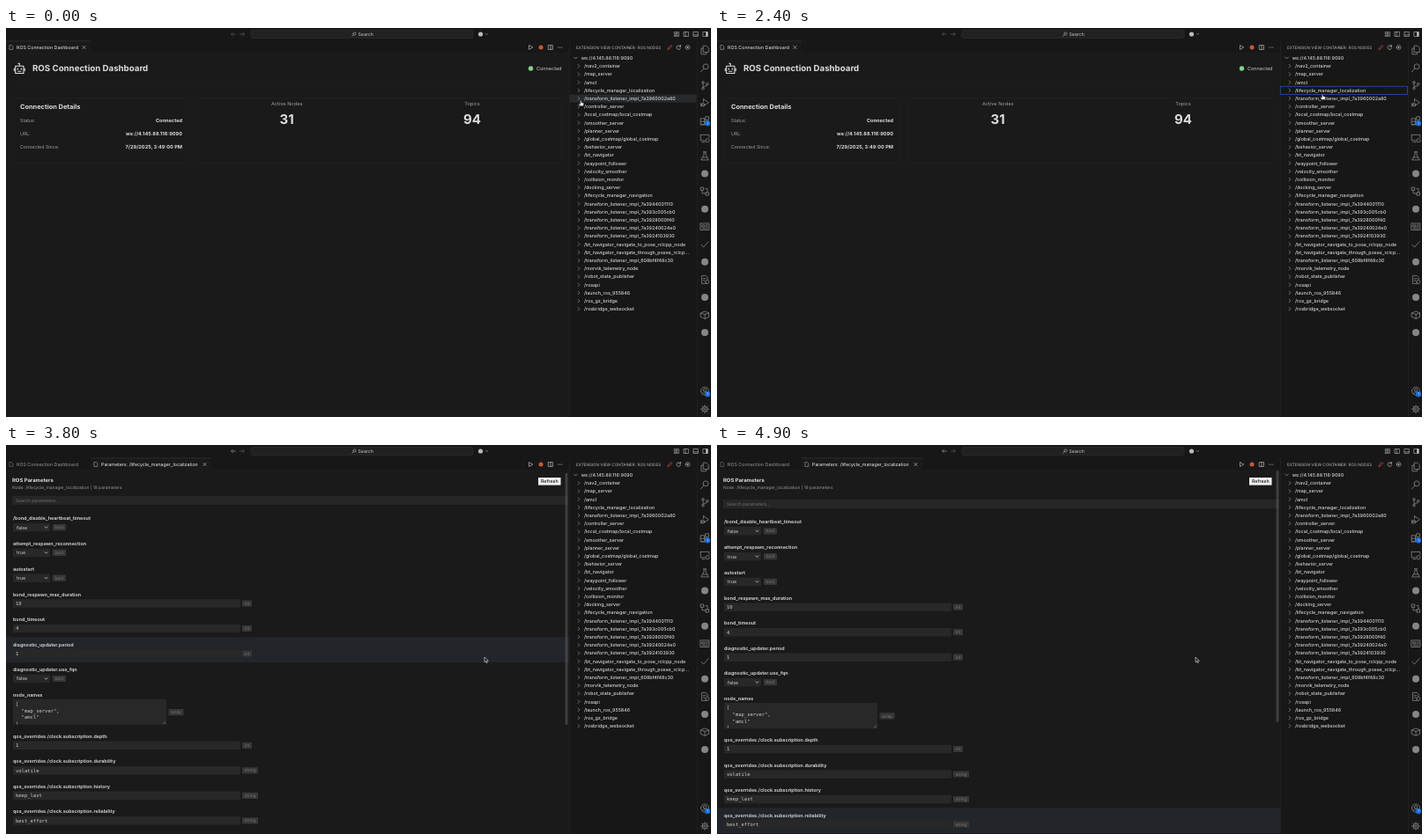
Recreate the animation shown at these times as an HTML page. Size 800x442 px, loop 5000 ms.

```html
<!DOCTYPE html>
<html lang="en">
<head>
<meta charset="utf-8">
<title>ROS node parameters</title>
<style>
html, body { margin: 0; width: 100%; height: 100%; overflow: hidden; background: #181818; }
svg { display: block; width: 100%; height: 100%; }
text { font-family: Inter, "Open Sans", sans-serif; fill: #ccc; text-rendering: geometricPrecision; }
.mono { font-family: "DejaVu Sans Mono", monospace; }
.medium { font-weight: 500; }
.bold { font-weight: 700; }
.line { fill: none; stroke: #868686; stroke-width: .8; stroke-linejoin: round; stroke-linecap: round; }
</style>
</head>
<body>
<svg id="stage" viewBox="0 0 800 442" preserveAspectRatio="none"></svg>
<script>
const LOOP = 5000, STEP = 100, OPEN_AT = 2700, CLICK_AT = 1700, SCROLL_AT = 3700;
const ROW = 9.2, FIRST_ROW = 43.3, TOP = 29, MAX_SCROLL = 183.5;

// y is the middle of the capitals
const text = (x, y, str, size = 5.4, { fill = '#ccc', cls = '', anchor = 'start' } = {}) =>
  `<text x="${x}" y="${y + size * .36}" font-size="${size}" class="${cls}" text-anchor="${anchor}" style="fill:${fill}">${str}</text>`;
const box = (x, y, w, h, fill, extra = '') =>
  `<rect x="${x}" y="${y}" width="${w}" height="${h}" fill="${fill}" ${extra}/>`;
const dot = (x, y, r, fill) => `<circle cx="${x}" cy="${y}" r="${r}" fill="${fill}"/>`;
const line = (x, y, d, stroke = '#868686', width = .8) =>
  `<path class="line" transform="translate(${x} ${y})" d="${d}" style="stroke:${stroke};stroke-width:${width}"/>`;
const ring = (x, y, r) => `M${x - r} ${y}a${r} ${r} 0 1 0 ${2 * r} 0a${r} ${r} 0 1 0 ${-2 * r} 0`;

const CROSS = 'M-1.6-1.6l3.2 3.2M1.6-1.6l-3.2 3.2';
const RIGHT = 'M-.9-1.8l1.8 1.8-1.8 1.8';
const DOWN = 'M-1.8-.9l1.8 1.8 1.8-1.8';
const PAGE = 'M-1.7-2.4h2.2l1.3 1.3v3.5h-3.5z';

const nodes = `nav2_container map_server amcl lifecycle_manager_localization
  transform_listener_impl_7a3960002a80 controller_server local_costmap/local_costmap smoother_server
  planner_server global_costmap/global_costmap behavior_server bt_navigator waypoint_follower
  velocity_smoother collision_monitor docking_server lifecycle_manager_navigation
  transform_listener_impl_7a3944001110 transform_listener_impl_7a393c005cb0
  transform_listener_impl_7a3928000f40 transform_listener_impl_7a39240024e0
  transform_listener_impl_7a3924103930 bt_navigator_navigate_to_pose_rclcpp_node
  bt_navigator_navigate_through_poses_rclcp... transform_listener_impl_608bf4f48c30
  morvik_telemetry_node robot_state_publisher rosapi launch_ros_955846 ros_gz_bridge
  rosbridge_websocket`.split(/\s+/);

const qos = (topic, depth, reliability) => [
  ['depth', depth, 'int'], ['durability', 'volatile', 'string'],
  ['history', 'keep_last', 'string'], ['reliability', reliability, 'string'],
].map(([key, value, type]) => [`qos_overrides./${topic}.${key}`, value, type]);

const params = [
  ['/bond_disable_heartbeat_timeout', 'false', 'bool'],
  ['attempt_respawn_reconnection', 'true', 'bool'],
  ['autostart', 'true', 'bool'],
  ['bond_respawn_max_duration', '10', 'int'],
  ['bond_timeout', '4', 'int'],
  ['diagnostic_updater.period', '1', 'int'],
  ['diagnostic_updater.use_fqn', 'false', 'bool'],
  ['node_names', '', 'array'],
  ...qos('clock.subscription', '1', 'best_effort'),
  ...qos('parameter_events.publisher', '1000', 'reliable'),
  ['start_type_description_service', 'true', 'bool'],
  ['use_sim_time', 'true', 'bool', 'Use simulation time instead of wall-clock time'],
];
const PITCH = { bool: 28.8, int: 28.5, string: 28.5, array: 47 };
let nextY = 87.5;
const tops = params.map(([, , type, note]) => {
  const y = nextY;
  nextY += PITCH[type] + (note ? 10 : 0);
  return y;
});

function badge(x, y, type) {
  const w = { bool: 15, int: 11, string: 18, array: 17 }[type];
  return box(x, y - 3.6, w, 7.2, '#373737', 'rx=".8"') +
    text(x + w / 2, y, type, 4.7, { fill: '#777', anchor: 'middle' });
}

function param([name, value, type, note], i) {
  const y = tops[i], mid = y + (note ? 20.5 : 10.3);
  let out = text(8, y, name, 5.35, { cls: 'bold' });
  if (note) out += text(8, y + 8.5, note, 4.9, { fill: '#999' });
  if (type === 'bool') {
    out += box(8, mid - 4.7, 42, 9.4, '#282828') + text(12, mid, value) +
      line(45.5, mid, 'M-1.5-.8l1.5 1.6 1.5-1.6', '#ccc') + badge(53, mid, type);
  } else if (type === 'array') {
    out += box(8, y + 4.8, 174, 29, '#282828') + badge(184.5, y + 19.7, type) +
      line(180, y + 32, 'M-2 1l3-3M0 1l1-1', '#888', .5);
    ['[', '"map_server",', '"amcl"', ']'].forEach((s, k) => {
      out += text(k % 3 ? 17.6 : 11, y + 9.8 + k * 7.8, s, 5.5, { cls: 'mono' });
    });
    out = `<g clip-path="url(#area)">${out}</g>`;
  } else {
    out += box(8, mid - 4.7, 258, 9.4, '#282828') +
      text(11, mid, value, 5.5, { cls: 'mono' }) + badge(268, mid, type);
  }
  return out;
}

function titleBar() {
  return box(0, 0, 800, 14.6, '#171717') +
    `<g id="back">${line(258, 7, 'M2.4 0h-4.8m1.8-1.8l-1.8 1.8 1.8 1.8')}</g>` +
    line(268, 7, 'M-2.4 0h4.8m-1.8-1.8l1.8 1.8-1.8 1.8', '#555') +
    box(278, 2.5, 252, 9, '#212121', 'rx="2" stroke="#343434" stroke-width=".5"') +
    line(395, 7, ring(.5, -.5, 1.6) + 'M-.7.7l-1.6 1.7', '#bbb', .6) + text(399.5, 7, 'Search', 5.2) +
    dot(538.5, 7, 2.6, '#bbb') + line(545.5, 7, 'M-1.2-.6l1.2 1.2 1.2-1.2', '#aaa', .6) +
    ['M-2.4-2.4h2v2h-2zM-2.4 1h2v1.4h-2zM1-2.4h1.4v4.8H1z', 'M-2.5-2.5h5v5h-5zM-.8-2.5v5',
     'M-2.5-2.5h5v5h-5zM-2.5.8h5', 'M-2.5-2.5h5v5h-5zM.8-2.5v5']
      .map((d, i) => line(761 + i * 10.9, 7, d, '#bbb', .6)).join('') +
    box(794.5, 4.5, 1.8, 5, '#ccc');
}

function tabBar() {
  return box(0, 14.6, 639, 14.6, '#171717') + box(0, 28.8, 639, .4, '#292929') +
    line(595.5, 22, 'M-1.7-2.3l4 2.3-4 2.3z', '#bbb', .7) + dot(607, 22, 2.5, '#c45a38') +
    line(618, 22, 'M-2.4-2.4h4.8v4.8h-4.8zM0-2.4v4.8', '#bbb', .7) +
    [626.8, 628.8, 630.8].map(x => dot(x, 22, .55, '#bbb')).join('');
}

const tab = (x, w, label, active) =>
  (active ? box(x, 14.6, w, 14.7, '#1a1a1a') + box(x, 14.6, w, .6, '#2f3a44') : '') +
  line(x + 6, 22, PAGE, active ? '#aaa' : '#777', .6) +
  text(x + 12, 22, label, 5.3, { fill: active ? '#eee' : '#999' }) +
  (active ? line(x + w - 7.5, 22, CROSS, '#ccc', .6) : '');

function dashboard() {
  const rows = [['Status:', 'Connected', 105], ['URL:', 'ws://4.145.88.116:9090', 120.3],
                ['Connected Since:', '7/29/2025, 3:49:00 PM', 135.3]];
  const card = 'stroke="#242424" stroke-width=".6" rx="1.5"';
  const stat = (x, label, n) => text(x, 86.3, label, 5.6, { fill: '#a0a0a0', anchor: 'middle' }) +
    text(x, 103.2, n, 15, { fill: '#ddd', cls: 'bold', anchor: 'middle' });
  return tab(0, 96, 'ROS Connection Dashboard', true) +
    line(15.3, 46, 'M-4.6-2.8h9.2v8.3h-9.2zM0-2.8v-3M-1.5-5.8h1.5M-6 0v2.6M6 0v2.6M-2-.2v1.4M2-.2v1.4M-1.6 3.2h3.2', '#ddd', 1.1) +
    text(30, 46, 'ROS Connection Dashboard', 9.7, { fill: '#ddd', cls: 'bold' }) +
    dot(595.5, 46, 2.7, '#82d28b') + text(602, 46, 'Connected', 5.5) +
    box(8, 66.8, 622, .4, '#212121') +
    box(8.3, 79.6, 200.5, 74, '#1a1a1a', card) + box(217, 79.6, 413, 74, '#1a1a1a', card) +
    text(16, 89, 'Connection Details', 7.4, { fill: '#ddd', cls: 'bold' }) +
    rows.map(([k, v, y]) => text(16, y, k, 5.3, { fill: '#a0a0a0' }) +
      text(200, y, v, 5.6, { fill: '#ddd', cls: 'bold', anchor: 'end' })).join('') +
    stat(318.7, 'Active Nodes', 31) + stat(529, 'Topics', 94);
}

function parameters() {
  return tab(0, 96, 'ROS Connection Dashboard', false) +
    tab(96, 137, 'Parameters: /lifecycle_manager_localization', true) +
    text(7, 40, 'ROS Parameters', 5.9, { fill: '#ddd', cls: 'bold' }) +
    text(7, 48, 'Node: /lifecycle_manager_localization | 18 parameters', 4.9, { fill: '#999' }) +
    box(604, 37, 25.5, 8.6, '#f2f2f2') +
    text(616.8, 41.3, 'Refresh', 5.3, { fill: '#111', cls: 'medium', anchor: 'middle' }) +
    `<g clip-path="url(#body)"><g id="list">
      <rect id="hover" width="639" height="28.8" fill="#22252a"/>
      ${box(7, 62, 630.5, 10, '#262626')}
      ${text(11, 67, 'Search parameters...', 5.05, { fill: '#707070' })}
      ${params.map(param).join('')}
    </g></g>
    <rect id="thumb" x="634.6" width="2.8" height="286" rx="1.2" fill="#797979" opacity=".4"/>`;
}

function sideBar() {
  const label = (x, y, str) => text(x, y, str, 5.35, { fill: '#d6d6d6', cls: 'medium' });
  return box(639, 14.6, 145, 428, '#171717') + box(639, 14.6, .5, 428, '#292929') +
    text(647, 22, 'EXTENSION VIEW CONTAINER: ROS NODES', 4.6, { fill: '#bbb' }) +
    line(753.3, 22, 'M-2.2 2.2l.5-1.7 3-3 1.2 1.2-3 3z', '#c24a42', .8) +
    line(763.3, 22, 'M1.9-1.2a2.3 2.3 0 1 0 .3 2M2.2-2.6v1.7h-1.7', '#bbb', .7) +
    line(773.5, 22, ring(0, 0, 2.4), '#bbb', .6) + dot(773.5, 22, .9, '#bbb') +
    `<rect id="row" x="639.3" width="144.2" height="${ROW}" stroke-width=".8"/>` +
    line(646.5, 34, DOWN, '#bbb', .6) + label(652.7, 34, 'ws://4.145.88.116:9090') +
    nodes.map((n, i) => line(650, FIRST_ROW + i * ROW, RIGHT, '#aaa', .6) +
      label(656, FIRST_ROW + i * ROW, '/' + n)).join('');
}

function activityBar() {
  const icons = [
    'M-1.5-4.8h3.3l2.4 2.4v5h-5.7zM-1.5-2h-2.6v6.8h5.6v-2.2',
    ring(1, -1.2, 3) + 'M-1.2 1l-3.4 3.8',
    ring(-2, -3.3, 1.3) + ring(-2, 3.5, 1.3) + ring(2.8, -1.5, 1.3) + 'M-2-2v4.2M2.8-.2c0 2-4.8.5-4.8 2.4',
    'M-1.5-4.5l5.8 4-5 3.4M-1.5-4.5v3' + ring(-2.2, 2, 1.9) + 'M-5 .4l1.2.8M-5 4l1.2-.8M-4.8 2h5',
    'M-4.5-2.5h4v7h-4zM-4.5 1h7.5v3.5h-7.5M1-4.5h3.5V-1H1z',
    'M-4.8-4h9.6v3M-4.8-4v6.5h4.5M-3 4.3h3' + ring(3, 2.4, 2.1),
    'M-1.5-4.6h3M-1-4.6v3.2l-3.3 5.9h8.6l-3.3-5.9v-3.2M-2.5 1.5h5',
    '',
    'M-4.5-4.5h3.2v3.2h-3.2zM1.3 1.3h3.2v3.2h-3.2zM-3-1.3v3.6h4.3M1-3h2v4',
    '',
    'M-4.8-3.8h9.6v7.6h-9.6zM-3-1.8h2.8v2h-2.8zM1.2-1.8h2M1.2 0h2M-3 2h6',
    'M-4 .5l2.5 2.8 5.6-6.5',
    '',
    'M2 4.5h-5.6v-9h4.8l2 2v2.2M-2-1.2h3M-2 1h2' + ring(2.7, 2.5, 2),
    '',
    'M-4.5-2.2l4.6-2 4.4 2v4.5l-4.4 2-4.6-2zM-4.5-2.2l4.6 1.7 4.4-1.7M.1-.5v4.8',
    '',
  ];
  const gear = Array.from({ length: 8 }, (_, i) => {
    const a = i * Math.PI / 4, c = Math.cos(a), s = Math.sin(a);
    return `M${3 * c} ${3 * s}L${4.5 * c} ${4.5 * s}`;
  }).join('');
  const count = y => dot(796, y, 3.2, '#1e6ad6') + text(796, y, '1', 4, { fill: '#fff', anchor: 'middle' });
  return box(784, 14.6, 16, 428, '#171717') + box(784, 14.6, .5, 428, '#292929') +
    icons.map((d, i) => d ? line(793, 25 + i * 20.07, d) : dot(793, 25 + i * 20.07, 4, '#868686')).join('') +
    count(108.3) + line(793, 412.5, ring(0, 0, 4.5) + ring(0, -1, 1.7) + 'M-3 3.2c1-2.6 5-2.6 6 0') + count(416) +
    line(793, 433, ring(0, 0, 3) + ring(0, 0, 1.2) + gear);
}

const stage = document.getElementById('stage');
stage.innerHTML = `<defs>
    <clipPath id="body"><rect y="57.5" width="639" height="385"/></clipPath>
    <clipPath id="area"><rect y="${tops[7] - 6}" width="639" height="39.8"/></clipPath>
  </defs>
  ${box(0, 0, 800, 442, '#1a1a1a')}${titleBar()}${tabBar()}
  <g id="dash">${dashboard()}</g><g id="params">${parameters()}</g>
  ${sideBar()}${activityBar()}
  <g id="cursor" stroke-width=".6" stroke-linejoin="round">
    <path id="arrow" fill="#111" stroke="#eee" d="M0 0v5.8l1.4-1.2.9 2 1-.4-.9-2h1.9z"/>
    <path id="hand" fill="#fff" stroke="#111" d="M-.7.4q.7-.8 1.4 0v2.2l2.1.5q.8.3.6 1.2l-.5 2.4h-3.6l-1.8-2.4q.2-.9 1.2-.3l.6.5z"/>
  </g>`;
const part = Object.fromEntries(['back', 'dash', 'params', 'list', 'hover', 'thumb', 'row', 'cursor', 'arrow', 'hand']
  .map(id => [id, document.getElementById(id)]));
const show = (el, on) => { el.style.display = on ? '' : 'none'; };

const path = [[0, 652.3, 82], [600, 681.5, 70], [1300, 681.5, 70], [2000, 687, 74.8], [2600, 687, 74.8],
              [3000, 610, 91], [3200, 610, 91], [3700, 543, 241]];
const scrolls = [[3700, 0], [3800, 4.2], [4300, MAX_SCROLL], [4600, MAX_SCROLL], [4900, 0]];

// eased values between [time, ...values] keys
function at(keys, t) {
  const i = keys.findIndex(k => k[0] > t);
  if (i < 1) return (i ? keys[keys.length - 1] : keys[0]).slice(1);
  const [a, b] = [keys[i - 1], keys[i]];
  const p = (t - a[0]) / (b[0] - a[0]), e = p * p * (3 - 2 * p);
  return a.slice(1).map((v, j) => v + (b[j + 1] - v) * e);
}

// hover stays on its row while the list is moving
function hovered(t, y) {
  if (t >= 4400) return 11;
  if (t >= SCROLL_AT) return 5;
  return tops.findLastIndex(top => top - 8.5 <= y);
}

function draw(t) {
  const [x, y] = at(path, t), [scroll] = at(scrolls, t);
  const open = t >= OPEN_AT, inTree = x > 639;
  show(part.dash, !open);
  show(part.params, open);
  part.back.style.opacity = open ? 1 : .5;

  const picked = !open && t >= CLICK_AT;
  const row = picked ? 3 : Math.floor((y - FIRST_ROW) / ROW + .5);
  show(part.row, inTree);
  part.row.setAttribute('y', FIRST_ROW + (row - .5) * ROW);
  part.row.setAttribute('fill', picked ? '#15171b' : '#27292b');
  part.row.setAttribute('stroke', picked ? '#1f52b4' : 'none');

  const item = hovered(t, y + scroll);
  show(part.hover, !inTree && item >= 0);
  if (item >= 0) part.hover.setAttribute('y', tops[item] - 8.5);
  part.list.setAttribute('transform', `translate(0 ${-scroll})`);
  show(part.thumb, t >= SCROLL_AT);
  part.thumb.setAttribute('y', TOP + scroll * .692);

  part.cursor.setAttribute('transform', `translate(${x} ${y})`);
  show(part.hand, inTree);
  show(part.arrow, !inTree);
}

function tick() {
  draw(Math.floor(performance.now() % LOOP / STEP) * STEP);
  requestAnimationFrame(tick);
}
tick();
</script>
</body>
</html>
```
